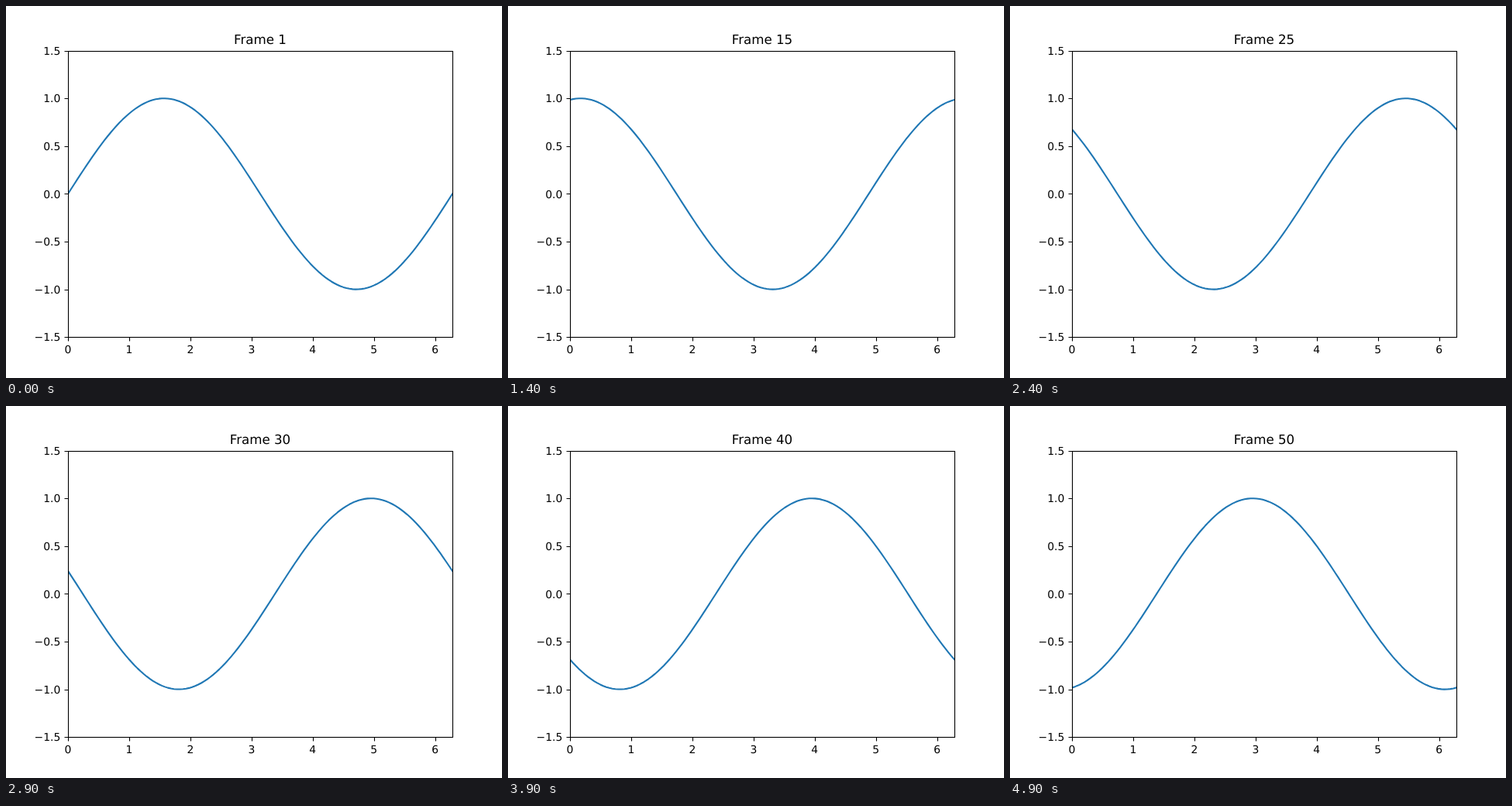
An HTML page that plays this animation: 640x480 px, repeating every 5 s.

```html
<!DOCTYPE html>
<html lang="en">
<head>
<meta charset="utf-8">
<title>Travelling sine wave</title>
<style>
  html, body { margin: 0; width: 100%; height: 100%; overflow: hidden; background: #fff; }
  svg { display: block; width: 640px; height: 480px; }
  text { font-family: "DejaVu Sans", sans-serif; font-size: 13.889px; fill: #000; text-rendering: geometricPrecision; }
  #title { font-size: 16.667px; text-anchor: middle; }
  .axis { fill: none; stroke: #000; stroke-width: 1.11; }
  #wave { fill: none; stroke: #1f77b4; stroke-width: 2.083; stroke-linejoin: round; stroke-linecap: square; }
</style>
</head>
<body>
<svg viewBox="0 0 640 480">
  <clipPath id="plot"><rect x="80" y="58" width="496" height="369"/></clipPath>
  <g clip-path="url(#plot)"><path id="wave"/></g>
  <path id="ticks" class="axis"/>
  <rect class="axis" x="80.5" y="58.5" width="496" height="369"/>
  <g id="labels"></g>
  <text id="title" x="328" y="49"></text>
</svg>
<script>
const LEFT = 80, WIDTH = 496, TOP = 57.6, HEIGHT = 369.6;
const SPAN = 2 * Math.PI, POINTS = 128;
const STEP_MS = 100, STEPS = 50, PHASE_STEP = 0.1;

const byId = id => document.getElementById(id);
const toX = x => LEFT + x / SPAN * WIDTH;
const toY = y => TOP + (1.5 - y) / 3 * HEIGHT;
const snap = v => Math.floor(v + 0.5) + 0.5;

function addLabel(text, x, y, anchor) {
  const el = document.createElementNS("http://www.w3.org/2000/svg", "text");
  el.setAttribute("x", x);
  el.setAttribute("y", y);
  el.setAttribute("text-anchor", anchor);
  el.textContent = text;
  byId("labels").append(el);
}

function drawAxes() {
  let d = "";
  for (let x = 0; x <= 6; x++) {
    d += `M${snap(toX(x))} 427.5v5`;
    addLabel(x, toX(x), 448, "middle");
  }
  for (let y = -1.5; y <= 1.5; y += 0.5) {
    d += `M80.5 ${snap(toY(y))}h-5`;
    addLabel(y.toFixed(1).replace("-", "\u2212"), 70.3, Math.round(toY(y) + 5.28), "end");
  }
  byId("ticks").setAttribute("d", d);
}

function draw(ms) {
  const step = Math.floor(ms / STEP_MS) % STEPS;
  const pts = Array.from({ length: POINTS }, (_, i) => {
    const x = i / (POINTS - 1) * SPAN;
    return `${toX(x).toFixed(2)} ${toY(Math.sin(x + step * PHASE_STEP)).toFixed(2)}`;
  });
  byId("wave").setAttribute("d", "M" + pts.join("L"));
  byId("title").textContent = `Frame ${step + 1}`;
}

function tick() {
  draw(performance.now());
  requestAnimationFrame(tick);
}

drawAxes();
tick();
</script>
</body>
</html>
```
